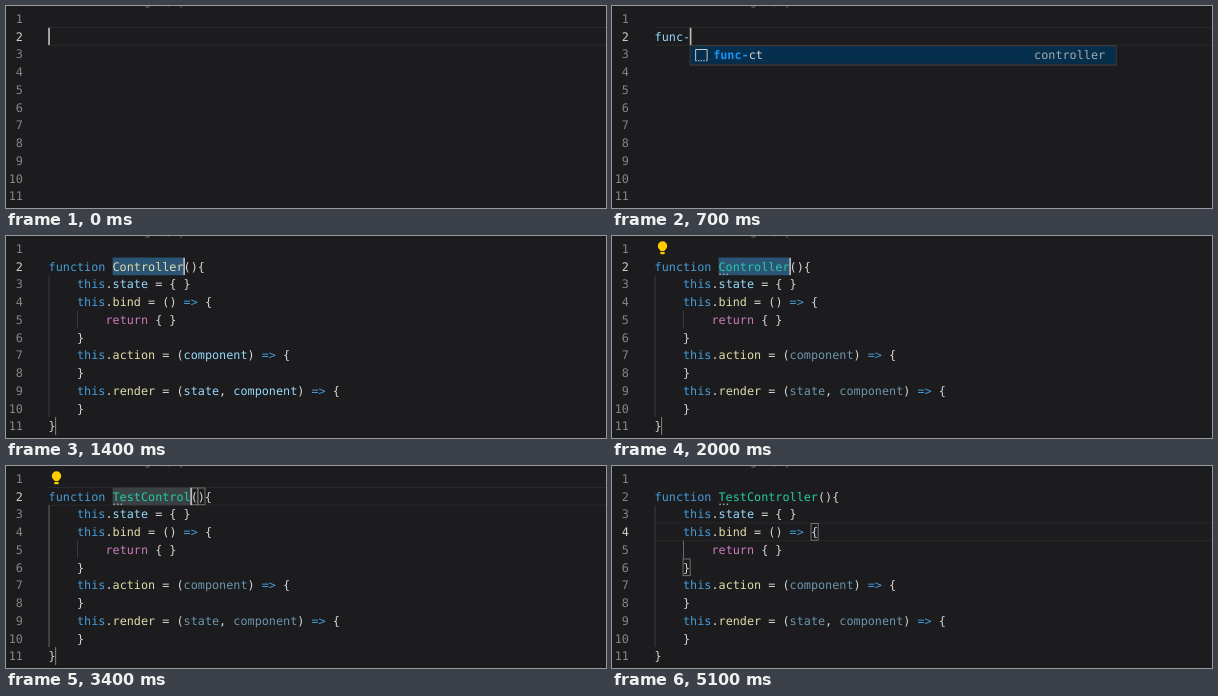
An HTML page that plays this animation: 600x202 px, repeating every 5200 ms.

```html
<!DOCTYPE html>
<html lang="en">
<head>
<meta charset="utf-8">
<title>Editor snippet</title>
<style>
html, body { margin: 0; width: 100%; height: 100%; overflow: hidden; background: #1c1b1d; }
svg { display: block; width: 600px; height: 202px; }
text {
  font: 11.81px "DejaVu Sans Mono", "Noto Sans CJK KR", "Noto Sans CJK", monospace;
  white-space: pre; text-rendering: geometricPrecision;
}
.abc { font: 9.5px "Liberation Sans", sans-serif; }
.hit { font-weight: bold; fill: #1994fa; }
</style>
</head>
<body>
<svg id="stage" viewBox="0 0 600 202"></svg>
<script>
(() => {
const LOOP = 5200, CHAR = 7.11, LEFT = 42.6, ROW = 17.74;
const C = {
  text: '#d6d6d6', keyword: '#459dda', flow: '#ca7bc0', call: '#dedda9',
  prop: '#95d9fb', type: '#27c9a5', number: '#858587', active: '#d0d0d0'
};
const stage = document.getElementById('stage');

const column = n => LEFT + n * CHAR;
const rowTop = line => 21.5 + (line - 2) * ROW;
const baseline = line => rowTop(line) + 13.1;

const rect = (x, y, w, h, fill, extra = '') =>
  `<rect x="${x}" y="${y}" width="${w}" height="${h}" fill="${fill}" ${extra}/>`;
const path = (d, color, extra = '') =>
  `<path d="${d}" fill="none" stroke="${color}" ${extra}/>`;
const text = (x, y, body, fill, extra = '') =>
  `<text x="${x}" y="${y}" fill="${fill}" ${extra}>${body}</text>`;
const span = (body, fill, opacity = 1) =>
  `<tspan fill="${fill}" fill-opacity="${opacity}">${body.replace('>', '&gt;')}</tspan>`;
const caret = (col, line) => rect(column(col) - 0.4, rowTop(line) + 0.3, 1.7, 17.3, '#b9b9b9');
const bracketBox = (col, line) =>
  rect(column(col), rowTop(line) + 0.5, CHAR, ROW - 1, 'none', 'stroke="#858585" stroke-width=".8"');
const lineBorder = line =>
  path(`M42 ${rowTop(line)}H600m0 ${ROW}H42`, '#29282a');

// Code colouring
const BODY = [
  '    this.state = { }',
  '    this.bind = () => {',
  '        return { }',
  '    }',
  '    this.action = (component) => {',
  '    }',
  '    this.render = (state, component) => {',
  '    }',
  '}'
];
function colour(code, faded) {
  let inParams = false;
  return code.split(/(\w+|=>|[()])/).filter(Boolean).map(word => {
    if (word === '(') inParams = true;
    if (word === ')') inParams = false;
    if (/^(this|function|=>)$/.test(word)) return span(word, C.keyword);
    if (word === 'return') return span(word, C.flow);
    if (/^(bind|action|render)$/.test(word)) return span(word, C.call);
    if (/^\w+$/.test(word)) return span(word, C.prop, faded && inParams ? 0.65 : 1);
    return span(word, C.text);
  }).join('');
}

// Suggestion list
const FUN_ITEMS = [
  ['snippet', 'func-ct', 'controller'],
  ['snippet', 'function', 'Function Statement'],
  ['value', 'Function'],
  ['method', 'futimesSync'],
  ['method', 'isFunction', '', true],
  ['method', 'isFunctionDeclaration'],
  ['method', 'isFunctionExpression'],
  ['method', 'isFunctionLike'],
  ['method', 'isFunctionOrConstructorTypeNode']
];
const WORD_ITEMS = [
  FUN_ITEMS[0],
  ...['click', 'click하게되면', 'code', 'com', 'component', 'component들에', 'console', 'constructor']
    .map(word => ['word', word])
];

function icon(kind, x, y) {
  if (kind === 'word') return text(x + 3, y + 3.2, 'abc', '#cfcfcf', 'class="abc"');
  if (kind === 'snippet') {
    return path(`M${x + 5.5} ${y + 5}v-10.5h11.5v10.5`, '#c8c8c8') +
      path(`M${x + 5} ${y + 5.7}h12.5`, '#c8c8c8', 'stroke-dasharray="1.5 1.2"');
  }
  if (kind === 'value') {
    return path(`M${x + 7} ${y - 4}h-2.3v8.5h2.3M${x + 15.5} ${y - 4}h2.3v8.5h-2.3` +
      `M${x + 8} ${y}l3.5-2.5 3.3 1.4v2l-3.6 2.4-3.2-1.3zl3.2 1.2 3.6-2.3`, '#58aee8');
  }
  return path(`M${x + 11.2} ${y - 5.8}l5.6 2.8v6l-5.6 3.1-5.6-3.1v-6z` +
    `M${x + 5.6} ${y - 3}l5.6 2.8 5.6-2.8m-5.6 2.8v6.1`, '#ab7bd0');
}

function highlight(label, query) {
  let next = 0;
  return [...label].map(ch => {
    if (next < query.length && ch.toLowerCase() === query[next]) {
      next++;
      return `<tspan class="hit">${ch}</tspan>`;
    }
    return ch;
  }).join('');
}

function popup(typed, items) {
  const x = column(typed.length), y = 39.8, width = 426, height = items.length * ROW + 1.5;
  let out = rect(x, y, width, height, '#222123', 'stroke="#454547" stroke-width=".9"');
  out += rect(x + 0.5, y + 0.6, width - 1, ROW - 0.4, '#052f4d');
  if (items.length > 3) out += rect(x + 0.5, y + 0.6 + 3 * ROW, width - 1, ROW, '#29292b');
  items.forEach(([kind, label, detail, struck], i) => {
    const mid = y + 9.2 + i * ROW;
    const query = kind === 'word' ? typed.split('-')[1] : typed;
    const body = struck ? label : highlight(label, query);
    out += icon(kind, x, mid);
    out += text(x + 23, mid + 4.1, body, struck ? '#868686' : C.text,
      struck ? 'text-decoration="line-through"' : '');
    if (detail) out += text(x + 415, mid + 4.1, detail, '#a4a8ab', 'text-anchor="end"');
  });
  if (items.length > 3) {
    const isWords = items === WORD_ITEMS;
    out += rect(x + 415.5, y + 0.6, 10, isWords ? 130 : 75, isWords ? '#39393b' : '#4d4d4f', 'fill-opacity=".9"');
  }
  return out;
}

// Timeline
const latest = (steps, t) => steps.filter(([at]) => at <= t).pop()[1];
const TYPED = [[0, ''], [100, 'f'], [300, 'fu'], [500, 'fun'], [600, 'func'],
  [700, 'func-'], [900, 'func-c'], [1200, 'func-ct']];
const LISTS = [[0, null], [200, FUN_ITEMS], [700, WORD_ITEMS.slice(0, 1)],
  [1000, WORD_ITEMS], [1200, [WORD_ITEMS[0], WORD_ITEMS[8]]], [1300, null]];
const KEYS = [2200, 2300, 2400, 2600, ...Array.from({ length: 10 }, (_, i) => 2800 + i * 100)];
const ACTIVE_LINE = [[0, 2], [4300, 3], [4500, 4]];

function gutter(activeLine) {
  let out = '';
  for (let n = 1; n <= 11; n++) {
    out += text(16.9, baseline(n), n, n === activeLine ? C.active : C.number, 'text-anchor="end"');
  }
  return out;
}

function typingScene(t) {
  const typed = latest(TYPED, t), items = latest(LISTS, t);
  return lineBorder(2) + text(LEFT, baseline(2), typed, C.prop) + caret(typed.length, 2) +
    (items ? popup(typed, items) : '');
}

function codeScene(t, line) {
  const keys = KEYS.filter(at => at <= t).length;
  const name = keys ? 'TestController'.slice(0, keys) : 'Controller';
  const end = 9 + name.length;
  const resolved = t >= 1500, inSnippet = t < 3900;
  const bright = keys > 0 && line < 4;
  let out = keys ? lineBorder(line) : '';

  if (inSnippet) {
    out += rect(column(9), rowTop(2), name.length * CHAR, ROW, keys ? '#3a4143' : '#2c5474');
    out += rect(column(1) - 0.6, rowTop(11), 1, ROW, '#858585');
  }
  out += rect(LEFT, rowTop(3), 0.9, ROW * 8, bright ? '#737373' : '#3f3e40');
  out += rect(column(4), rowTop(5), 0.9, ROW, line === 4 ? '#737373' : '#3f3e40');

  out += text(LEFT, baseline(2), span('function ', C.keyword) +
    span(name, resolved ? C.type : C.call) + span('(){', C.text), C.text);
  BODY.forEach((code, i) => { out += text(LEFT, baseline(i + 3), colour(code, resolved), C.text); });

  if (t >= 1800) {
    for (let i = 0; i < 3; i++) out += rect(column(9) + 0.8 + i * 3.6, 37.6, 1.5, 1.5, '#a5a5a5');
  }
  const bulb = (t >= 1800 && t < 2200) || (t >= 2500 && t < 4100);
  if (bulb) {
    out += '<circle cx="50.5" cy="10" r="4.7" fill="#fc0"/>' +
      rect(48.4, 12.5, 4.2, 2.6, '#fc0') + rect(48.4, 16, 4.2, 2.2, '#fc0');
  }

  if (line === 2) {
    if (keys) out += bracketBox(end, 2) + bracketBox(end + 1, 2);
    if (t < 4200) out += caret(end, 2);
  } else if (line === 3) {
    out += caret(20, 3);
  } else {
    out += bracketBox(22, 4) + bracketBox(4, 6);
    if (t < 5000) out += caret(23, 4);
  }
  return out;
}

function draw(t) {
  const line = latest(ACTIVE_LINE, t);
  stage.innerHTML = rect(0, 0, 600, 202, '#1c1b1d') +
    text(138, -1, 'g  , p', '#777') + gutter(line) +
    (t < 1400 ? typingScene(t) : codeScene(t, line));
}

const start = performance.now();
let shown = -1;
function tick() {
  const t = Math.floor((performance.now() - start) % LOOP / 100) * 100;
  if (t !== shown) draw(shown = t);
  requestAnimationFrame(tick);
}
tick();
})();
</script>
</body>
</html>
```
